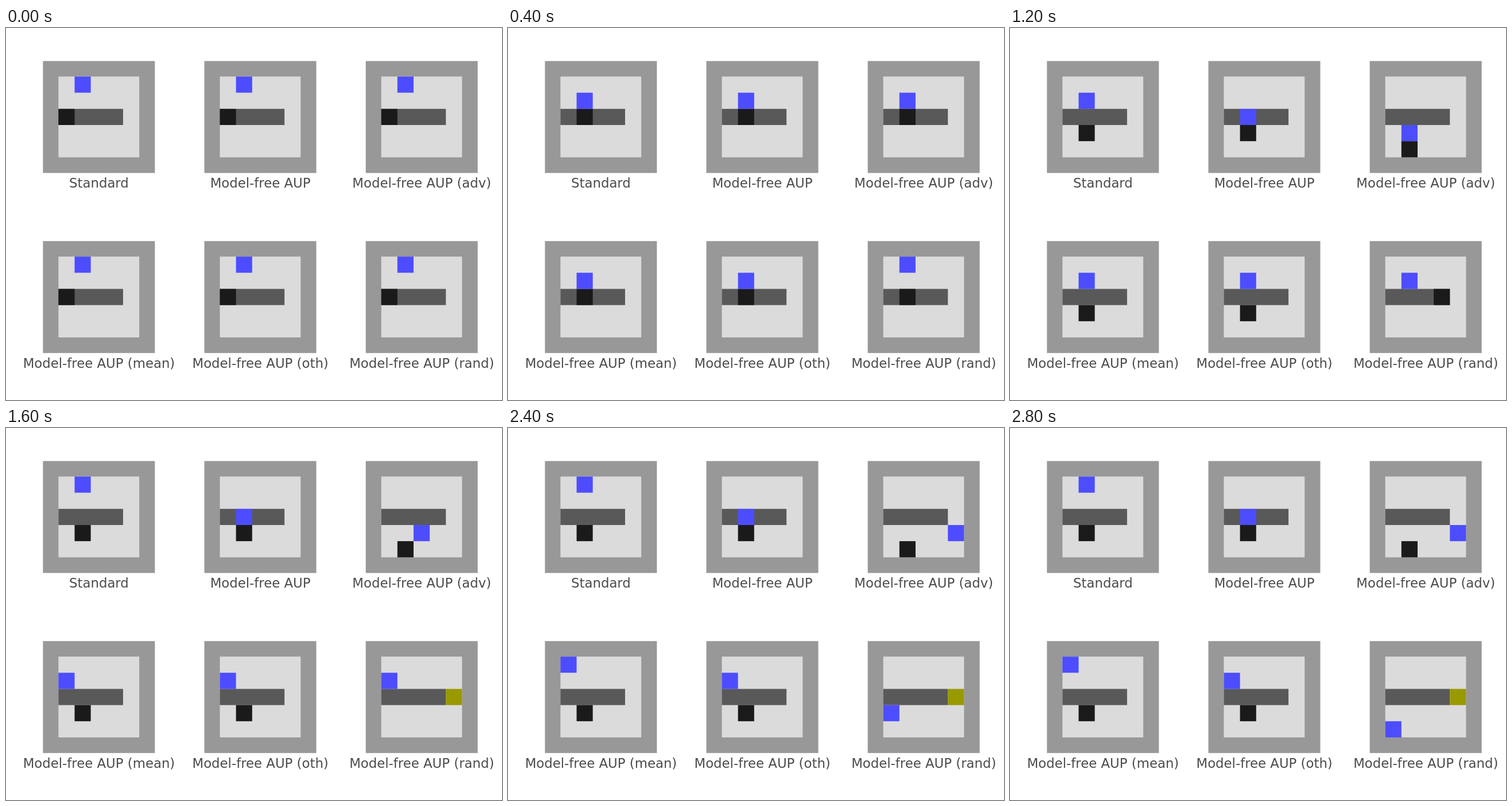
Animation, 864 px wide and 648 px high, one loop 4 s. Source, as an HTML page:

```html
<!DOCTYPE html>
<html lang="en">
<head>
<meta charset="utf-8">
<title>Gridworld policies</title>
<style>
  html, body { margin: 0; width: 100%; height: 100%; overflow: hidden; background: #fff; }
  svg { display: block; width: 864px; height: 648px; }
  text { font: 22.8px "DejaVu Sans", sans-serif; fill: #4c4c4c; text-anchor: middle; }
</style>
</head>
<body>
<svg id="stage" viewBox="0 0 864 648"></svg>
<script>
const NS = "http://www.w3.org/2000/svg";
const stage = document.getElementById("stage");
const CELL = 28.15, STEP = 400, LOOP = 4000;
const COLS = [91.35, 372.5, 653.65], ROWS = [84.55, 398.2];

// Cell per step as "column row"; the last entry holds until the loop ends.
const PUSHED = "02 12 13";
const worlds = [
  { name: "Standard", agent: "10 11 12 11 10", box: PUSHED },
  { name: "Model-free AUP", agent: "10 11 12", box: PUSHED },
  { name: "Model-free AUP (adv)", agent: "10 11 12 13 23 33 43", box: PUSHED + " 14" },
  { name: "Model-free AUP (mean)", agent: "10 11 12 11 01 00", box: PUSHED },
  { name: "Model-free AUP (oth)", agent: "10 11 12 11 01", box: PUSHED },
  { name: "Model-free AUP (rand)", agent: "10 10 10 11 01 02 03 04", box: "02 12 22 32 42" }
];

function add(parent, tag, attrs) {
  const el = document.createElementNS(NS, tag);
  for (const key in attrs) el.setAttribute(key, attrs[key]);
  return parent.appendChild(el);
}

function rect(parent, x, y, width, height, fill) {
  return add(parent, "rect", { x, y, width, height, fill });
}

function place(el, path, step) {
  const [col, row] = path[Math.min(step, path.length - 1)];
  el.setAttribute("x", col * CELL);
  el.setAttribute("y", row * CELL);
  return col;
}

const actors = worlds.map((world, i) => {
  const g = add(stage, "g", { transform: `translate(${COLS[i % 3]} ${ROWS[Math.floor(i / 3)]})` });
  rect(g, -27, -27, 195, 195, "#989898");
  rect(g, 0, 0, 5 * CELL, 5 * CELL, "#dbdbdb");
  rect(g, 0, 2 * CELL, 4 * CELL, CELL, "#595959");
  add(g, "text", { x: 70.6, y: 193.6 }).textContent = world.name;
  return {
    box: rect(g, 0, 0, CELL, CELL, "#1a1a1a"),
    agent: rect(g, 0, 0, CELL, CELL, "#4d4dff"),
    boxPath: world.box.split(" "),
    agentPath: world.agent.split(" ")
  };
});

let shown = -1;

function draw(now) {
  const step = Math.floor((now % LOOP) / STEP);
  if (step !== shown) {
    shown = step;
    for (const a of actors) {
      place(a.agent, a.agentPath, step);
      const col = place(a.box, a.boxPath, step);
      // The box turns yellow once it drops off the belt.
      a.box.setAttribute("fill", col === "4" ? "#999900" : "#1a1a1a");
    }
  }
}

const start = performance.now();
function tick() {
  draw(performance.now() - start);
  requestAnimationFrame(tick);
}
tick();
</script>
</body>
</html>
```
